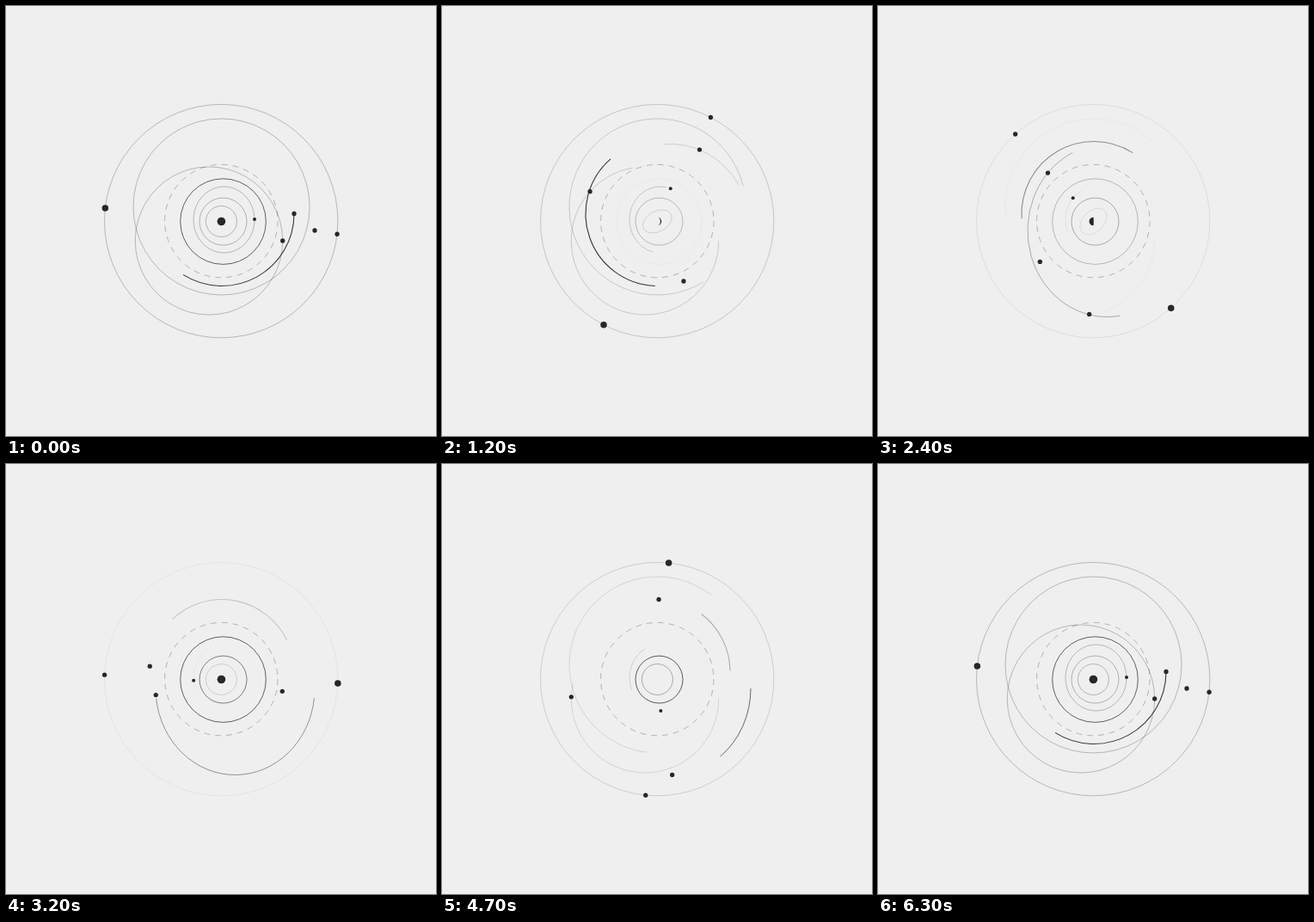
An HTML page that plays this animation: 500x500 px, repeating every 6.4 s.

```html
<!DOCTYPE html>
<html lang="en">
<head>
<meta charset="utf-8">
<title>Orbits</title>
<style>
  html, body { margin: 0; width: 100%; height: 100%; overflow: hidden; background: #efefef; }
  svg { display: block; width: 100%; height: 100%; }
</style>
</head>
<body>
<svg id="stage" viewBox="0 0 500 500" fill="none" stroke-width="0.8"></svg>
<script>
const NS = 'http://www.w3.org/2000/svg';
const stage = document.getElementById('stage');
const INK = '#272727';
const STEP = 100, STEPS = 64, SPAN = 63, HALF = SPAN / 2, TURN = 62.5;

function set(el, attrs) {
  for (const k in attrs) el.setAttribute(k, attrs[k]);
}
function add(tag, attrs) {
  const el = document.createElementNS(NS, tag);
  set(el, attrs);
  stage.appendChild(el);
  return el;
}

// All times are in steps
const clamp = x => Math.max(0, Math.min(1, x));
const ease = (a, b, s) => (1 - Math.cos(Math.PI * clamp((s - a) / (b - a)))) / 2;
const out = (x, power) => 1 - (1 - clamp(x)) ** power;
const wave = (s, span = SPAN) => (1 + Math.cos(2 * Math.PI * s / span)) / 2;

const oval = (cx, cy, rx, ry = rx) => ({ cx, cy, rx, ry });
function point(o, deg) {
  const a = deg * Math.PI / 180;
  return [o.cx + o.rx * Math.cos(a), o.cy + o.ry * Math.sin(a)];
}
const xy = p => p[0].toFixed(2) + ' ' + p[1].toFixed(2);

function arc(o, from, to) {
  const sweep = to - from;
  if (Math.abs(sweep) < 0.3) return '';
  const n = Math.ceil(Math.abs(sweep) / 120);
  let d = 'M' + xy(point(o, from));
  for (let i = 1; i <= n; i++) {
    d += `A${o.rx} ${o.ry} 0 0 ${sweep > 0 ? 1 : 0} ${xy(point(o, from + sweep * i / n))}`;
  }
  return d;
}

const core = oval(250.4, 250.5, 18);
const rim = oval(250.2, 250.1, 135.7);
const wide = oval(236, 273, 85.7, 86);
const tall = oval(266.5, 261, 92.5, 100.5);
const tiny = oval(253.5, 248.5, 35.5, 38.5);
const bold = oval(251, 241.5, 84);
const upper = oval(250.5, 233.5, 102.5);
const inner = oval(252.5, 250.6, 27.5);
const middle = oval(252.5, 250.6, 49.8);

// Lines whose ends travel; from and to are fractions of a clockwise turn
const trails = [
  { o: upper,
    from: s => -0.31 * (ease(0, 53, s) - ease(39, 55, s)),
    to: s => -1 + 0.62 * (ease(0, 35, s) - ease(34, 58, s)),
    alpha: s => 0.36 * wave(s) },
  { o: wide,
    from: () => 0,
    to: s => 1 - ease(0, 34, s) + ease(35, 58, s),
    alpha: s => 0.36 * wave(s) },
  { o: tall,
    from: s => -ease(0, TURN, s),
    to: s => -ease(0, 35, s),
    alpha: s => clamp(s / 55) },
  { o: tiny,
    from: s => 0.44 * (ease(0, 20, s) - ease(47, 63, s)),
    to: s => 1 - 0.33 * (ease(0, 20, s) - ease(47, 63, s)),
    alpha: s => 0.05 + 0.31 * wave(s) },
  { o: bold, width: 1.1,
    from: s => out(s / SPAN, 1.4),
    to: s => out((s + 10.5) / 61, 2.2) + out((s - 52.5) / 61, 2.2),
    alpha: s => 0.15 + 0.85 * wave(s - 6) }
];

// Whole rings that only fade
const rings = [
  { o: rim, alpha: s => 0.08 + 0.27 * wave(s) },
  { o: inner, alpha: s => 0.35 + 0.65 * (1 - wave(s - 11)) ** 2 },
  { o: middle, alpha: s => 0.9 * wave(s, HALF) ** 1.5 }
];

add('circle', {
  cx: 250.3, cy: 250.1, r: 65.7,
  stroke: INK, 'stroke-opacity': 0.38, 'stroke-dasharray': '6.9 6'
});
for (const r of rings) r.el = add('ellipse', { ...r.o, stroke: INK });
for (const t of trails) t.el = add('path', { stroke: INK, 'stroke-width': t.width || 0.8 });
const halo = add('ellipse', { ...core, stroke: INK });
const moon = add('path', { fill: INK });

// Lit part of the moon for a phase q from full (0) to full (1)
function lit(q) {
  const r = 4.8, k = Math.cos(q * 2 * Math.PI);
  if (k < -0.97) return '';
  const right = q < 0.5 ? 1 : 0;
  const bulge = k > 0 ? right : 1 - right;
  return `M${core.cx} ${core.cy - r}a${r} ${r} 0 0 ${right} 0 ${2 * r}` +
    `a${(Math.abs(k) * r).toFixed(3)} ${r} 0 0 ${bulge} 0 ${-2 * r}z`;
}

const dots = [
  { o: rim, r: 3.75, start: 186.4, dir: -1 },
  { o: rim, r: 2.65, start: 6.4, dir: -1 },
  { o: bold, r: 2.65, start: 0, dir: 1 },
  { o: tall, r: 2.65, start: 0, dir: -1 },
  { o: wide, r: 2.65, start: 0, dir: -1, fast: true },
  { o: tiny, r: 2, start: -0.7, dir: -1 }
];
for (const d of dots) d.el = add('circle', { r: d.r, fill: INK });

function draw(ms) {
  const s = Math.floor(ms / STEP) % STEPS;
  const h = s % HALF;
  const turn = 360 * clamp(s / TURN);
  const fastTurn = 360 * clamp(2 * h / TURN);

  for (const r of rings) set(r.el, { 'stroke-opacity': r.alpha(s) });
  for (const t of trails) {
    set(t.el, {
      d: arc(t.o, 360 * t.from(s), 360 * t.to(s)),
      'stroke-opacity': t.alpha(s)
    });
  }

  // The halo tips edge-on, then less far on the way back
  const tip = Math.sin(2 * Math.PI * h / HALF);
  set(halo, {
    ry: core.rx * (1 - (0.56 + 0.24 * tip) * tip * tip),
    transform: `rotate(${-10 - 45 * h / HALF} ${core.cx} ${core.cy})`,
    'stroke-opacity': 0.12 + 0.3 * wave(s + 10)
  });
  set(moon, { d: lit(h / HALF) });

  for (const d of dots) {
    const [cx, cy] = point(d.o, d.start + d.dir * (d.fast ? fastTurn : turn));
    set(d.el, { cx: cx.toFixed(2), cy: cy.toFixed(2) });
  }
}

const begin = performance.now();
function tick() {
  draw(performance.now() - begin);
  requestAnimationFrame(tick);
}
tick();
</script>
</body>
</html>
```
